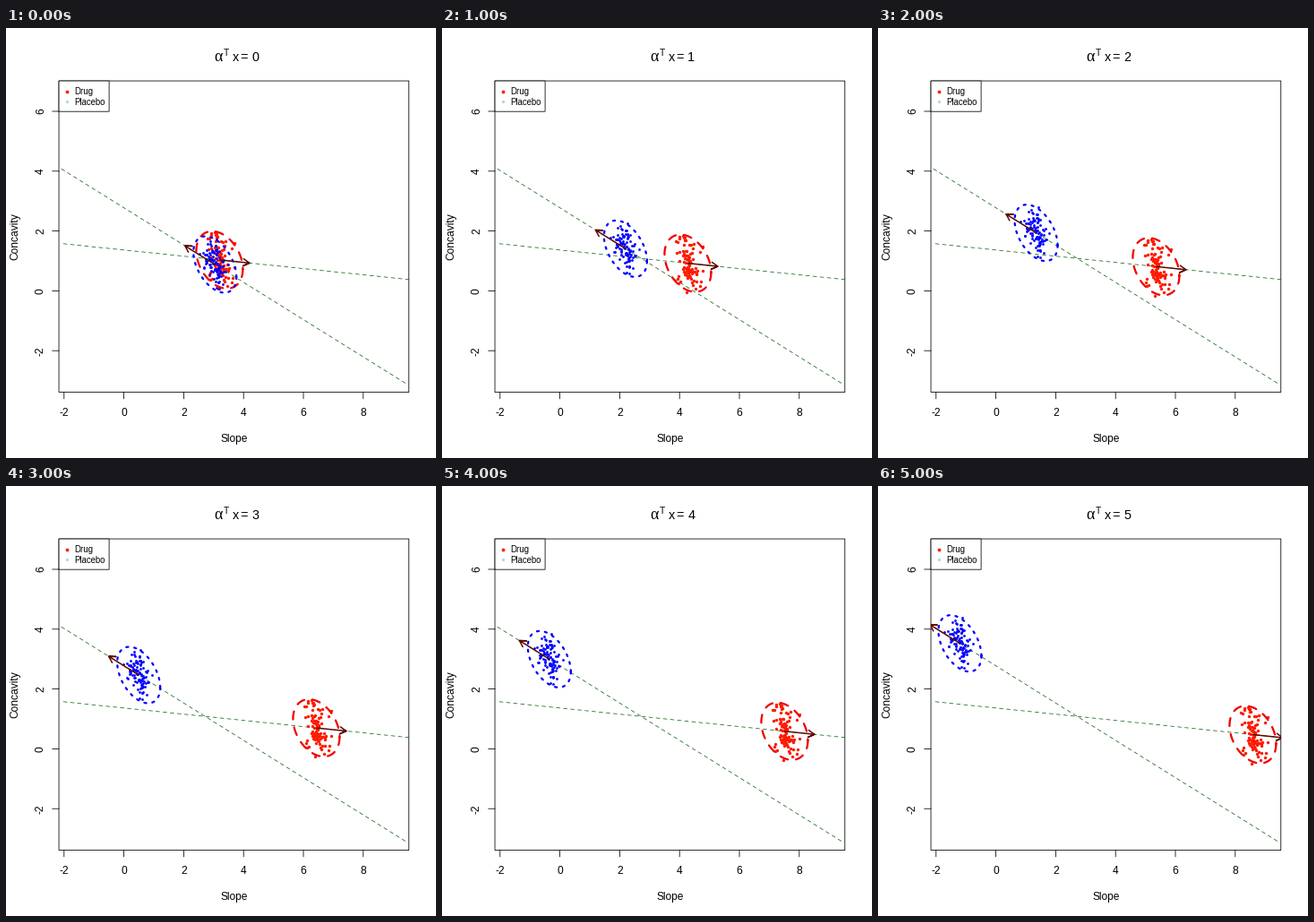
Animation, 480 px wide and 480 px high, one loop 6 s. Source, as a matplotlib script:

```python
import numpy as np
import matplotlib.pyplot as plt
from matplotlib.animation import FuncAnimation
from matplotlib.patches import Rectangle

SIZE, DPI = 480, 100
PX = 72 / DPI                      # points per pixel
LEFT, RIGHT, TOP, BOTTOM = 59.04, 449.76, 59.04, 406.56
UNIT = 33.4                        # pixels per data unit
MEET = np.array([222.3, 257.2])    # crossing of the two direction lines
THIN = 0.8

fig = plt.figure(figsize=(SIZE / DPI, SIZE / DPI), dpi=DPI, facecolor="white")
ax = fig.add_axes([0, 0, 1, 1])
ax.set_xlim(0, SIZE)
ax.set_ylim(SIZE, 0)
ax.axis("off")


def line(xs, ys, color="black", width=THIN, **kw):
    return ax.plot(xs, ys, color=color, lw=width * PX, snap=False, **kw)[0]


def label(x, y, s, size=12, ha="center", rotation=0, font="Liberation Sans"):
    return ax.text(x, y, s, fontsize=size * PX, family=font, ha=ha,
                   va="baseline", rotation=rotation, rotation_mode="anchor")


def dots(color, size):
    return ax.plot([], [], "o", color=color, ms=size * PX, mew=0)[0]


def frame_box(right, bottom, z):
    box = Rectangle((LEFT, TOP), right - LEFT, bottom - TOP, fc="white",
                    ec="black", lw=THIN * PX, snap=False, zorder=z)
    return ax.add_patch(box)


def cloud(seed, count, spread, lean, limit):
    """Leaning normal cloud around zero, cut off at the limits."""
    rng = np.random.default_rng(seed)
    y = rng.normal(0, spread[1], 3 * count)
    x = rng.normal(0, spread[0], 3 * count) + lean * y
    keep = (abs(x) < limit[0]) & (abs(y) < limit[1])
    return np.column_stack([x, y])[keep][:count]


def ellipse(a, b, rho):
    t = np.linspace(0, 2 * np.pi, 200)
    return np.column_stack([a * np.cos(t), b * np.cos(t - np.arccos(rho))])


def arrow(start, tip):
    """Open arrow with 30 degree barbs."""
    back = np.arctan2(*(start - tip)[::-1])
    ends = [tip + 8 * np.array([np.cos(back + s), np.sin(back + s)])
            for s in (-np.pi / 6, np.pi / 6)]
    return np.array([start, tip, ends[0], tip, ends[1]])


class Group:
    """Points and their ellipse, sliding along a direction line."""

    def __init__(self, slope, start, step, sign, pts, ring, color, size, dash):
        self.slope, self.start, self.step, self.sign = slope, start, step, sign
        self.pts, self.ring = pts, ring
        self.dots = dots(color, size)
        self.loop = line([], [], color, 2.25, linestyle=(0, dash),
                         dash_capstyle="round", zorder=4)
        self.arrow = line([], [], "#5c0a00", 1.5, zorder=5,
                          solid_capstyle="round", solid_joinstyle="round")
        self.arrow.set_clip_path(plot_box)

    def at(self, x):
        return np.array([x, MEET[1] + self.slope * (x - MEET[0])])

    def move(self, k):
        x = self.start + k * self.step
        mid = self.at(x)
        self.dots.set_data(*(self.pts + mid).T)
        self.loop.set_data(*(self.ring + mid).T)
        self.arrow.set_data(*arrow(mid, self.at(x + self.sign * UNIT)).T)
        return [self.dots, self.loop, self.arrow]


# Plot frame, axes and labels
plot_box = frame_box(RIGHT, BOTTOM, 0)
for v in range(-2, 9, 2):
    x = 131.6 + UNIT * v
    line([x, x], [BOTTOM, BOTTOM + 7.2])
    label(x, 433, str(v))
for v in range(-2, 7, 2):
    y = 293.4 - UNIT * v
    line([LEFT - 7.2, LEFT], [y, y])
    label(42, y, str(v), rotation=90)
label(254.4, 462, "Slope")
label(13, 233, "Concavity", rotation=90)

# Title
label(232.8, 37, "α", 18, "left", font="Liberation Serif")
label(246.2, 31, "T", 10.2)
label(253, 37, "x", 14.4, "left")
label(265.8, 37, "=", 14.4)
digit = label(278.3, 37, "0", 14.4)

# Legend
frame_box(115.1, 93.2, 1)
for y, name, color, size in ((70.6, "Drug", "#ff2400", 3.9),
                             (82.4, "Placebo", "lightblue", 3.3)):
    dots(color, size).set_data([67.6], [y])
    label(76, y + 3.6, name, 9.6, "left")

drug = Group(0.1036, 238.4, 36, 1,
             cloud(11, 92, (5.5, 16), 0.2, (18, 46)), ellipse(26, 32, 0.32),
             "#ff1a00", 3.4, (4, 4))
drug.loop.set_color("#f00000")
placebo = Group(0.623, 233.2, -28.35, -1,
                cloud(9, 95, (5.8, 14), 0.22, (18, 30)),
                ellipse(24, 31.5, 0.44), "#0000ff", 2.8, (1, 3))
groups = [drug, placebo]

# Direction lines
for group, x0, x1 in ((placebo, 62, 447), (drug, 64, 450)):
    line(*zip(group.at(x0), group.at(x1)), "#1f6b1f", linestyle=(0, (5, 5)),
         dash_capstyle="round", zorder=1.5)


def draw(k):
    digit.set_text(str(k))
    return [digit] + [art for g in groups for art in g.move(k)]


anim = FuncAnimation(fig, draw, frames=6, interval=1000, repeat=True,
                     repeat_delay=0, init_func=lambda: draw(0), blit=False)
plt.show()
```
